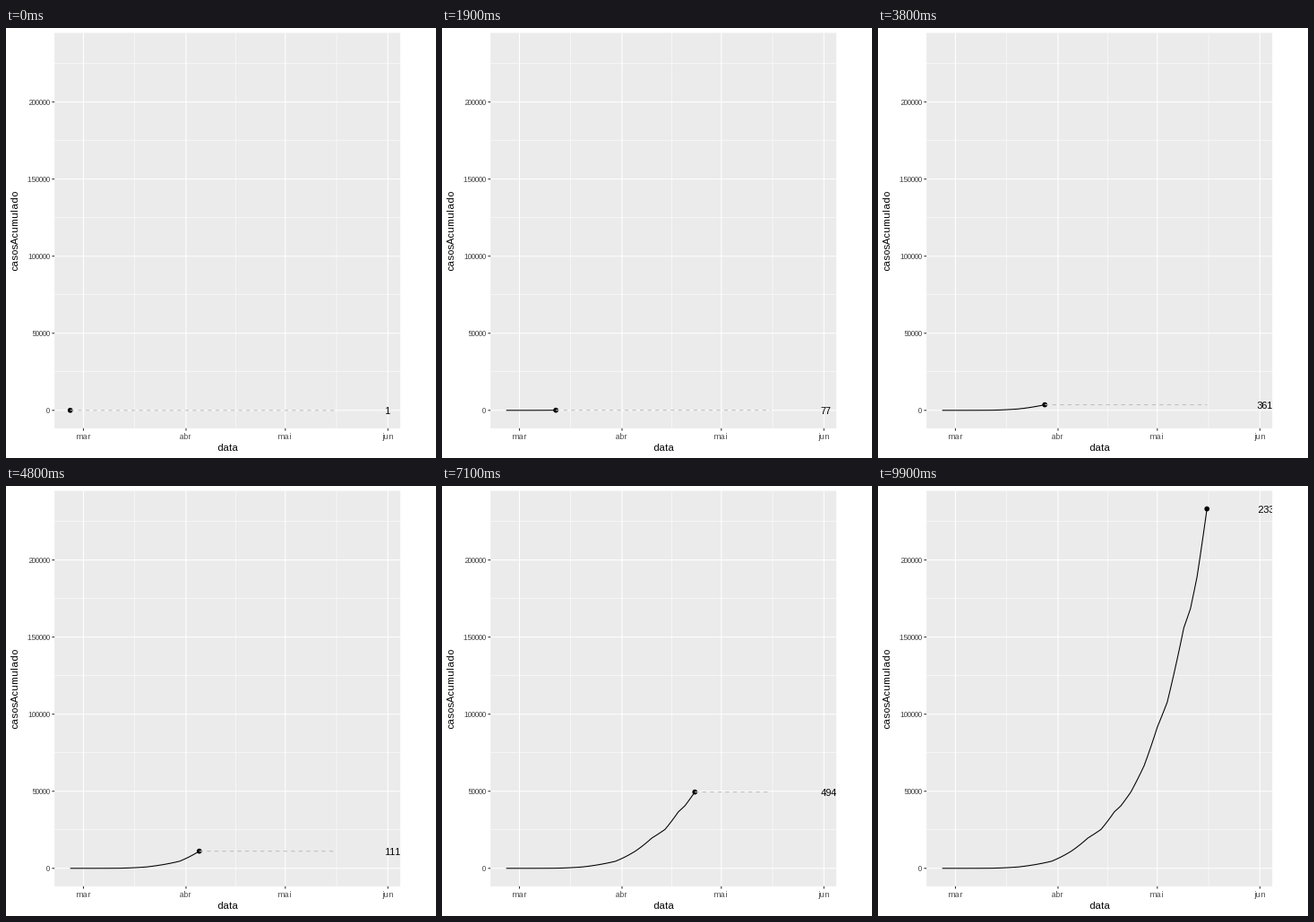
A matplotlib script for the animation above (10000 ms loop, 480 by 480 pixels).

```python
import matplotlib.pyplot as plt
import numpy as np
from matplotlib.animation import FuncAnimation
from matplotlib.patches import Circle, Rectangle
from matplotlib.transforms import Bbox

SIZE, FRAMES, INTERVAL = 480, 100, 100
LEFT, RIGHT, TOP, BOTTOM = 54.15, 440.15, 5.48, 446.85
LINE = 1.067
LAST_DAY, LABEL_DAY = 80, 95

# (day, cumulative cases); growth is close to quadratic between these points
KNOTS = [(0, 1), (7, 3), (9, 13), (15, 77), (23, 904), (33, 4579), (39, 11130),
         (44, 19638), (48, 25262), (52, 36599), (54, 40581), (57, 49492),
         (61, 66501), (65, 91589), (68, 107780), (73, 155939), (75, 168331),
         (77, 188974), (80, 233142)]
knot_days, knot_cases = np.transpose(KNOTS)
DAYS = np.arange(LAST_DAY + 1)
CASES = np.round(np.interp(DAYS, knot_days, np.sqrt(knot_cases)) ** 2)

# Each day lands on a whole frame; frames in between are interpolated
KEYS = np.round(DAYS * (FRAMES - 1) / LAST_DAY)


def px(day):
    step = (RIGHT - LEFT) / 1.1 / LABEL_DAY
    return LEFT + (0.05 * LABEL_DAY + day) * step


def py(cases):
    span = CASES[-1] - CASES[0]
    return BOTTOM - (0.05 * span + cases - CASES[0]) * (BOTTOM - TOP) / 1.1 / span


# Whole-pixel letter spacing without kerning
plt.rcParams.update({"font.family": "Liberation Sans",
                     "text.hinting_factor": 1, "text.kerning_factor": 6})
fig = plt.figure(figsize=(SIZE / 72, SIZE / 72), dpi=72, facecolor="white")
ax = fig.add_axes([0, 0, 1, 1])
ax.set(xlim=(0, SIZE), ylim=(SIZE, 0))
ax.axis("off")


def stroke(xs, ys, color, width=LINE, **kw):
    return ax.plot(xs, ys, color=color, lw=width, snap=False,
                   solid_capstyle="butt", solid_joinstyle="round",
                   dash_capstyle="butt", **kw)[0]


def vline(day, width):
    stroke([px(day)] * 2, [TOP, BOTTOM], "white", width)


def hline(cases, width):
    stroke([LEFT, RIGHT], [py(cases)] * 2, "white", width)


def label(x, y, text, size=11, color="black", ha="center", **kw):
    return ax.text(x, y, text, size=size, color=color, ha=ha, va="baseline", **kw)


ax.add_patch(Rectangle((LEFT, TOP), RIGHT - LEFT, BOTTOM - TOP,
                       fc="#ebebeb", lw=0, snap=False))

months = {"mar": 4, "abr": 35, "mai": 65, "jun": 96}
starts = list(months.values())
levels = range(0, 200001, 50000)

for a, b in zip(starts, starts[1:]):
    vline((a + b) / 2, LINE / 2)
for level in levels:
    hline(level + 25000, LINE / 2)
for day in starts:
    vline(day, LINE)
for level in levels:
    hline(level, LINE)

for name, day in months.items():
    stroke([px(day)] * 2, [BOTTOM, BOTTOM + 2.74], "#333333")
    label(px(day), 459, name, 8.8, "#4d4d4d")
for level in levels:
    stroke([LEFT - 2.74, LEFT], [py(level)] * 2, "#333333")
    label(LEFT - 4.93, round(py(level) + 3.5), str(level), 8.8, "#4d4d4d", "right")

label((LEFT + RIGHT) / 2, 472, "data")
label(13, (TOP + BOTTOM) / 2, "casosAcumulado", rotation=90, rotation_mode="anchor")

curve = stroke([], [], "black", zorder=3)
dot = ax.add_patch(Circle((0, 0), 2.84, fc="black", lw=0, zorder=4))
guide = stroke([], [], "#bebebe", linestyle=(0, (4, 4)), zorder=5)
count = label(px(LABEL_DAY), 0, "", 11.04, ha="left", clip_on=True, zorder=6)
count.set_clip_box(Bbox([[LEFT, SIZE - BOTTOM], [RIGHT, SIZE - TOP]]))


def update(i):
    day = np.interp(i, KEYS, DAYS)
    cases = np.interp(i, KEYS, CASES)
    x, y = px(day), py(cases)
    past = DAYS < day
    curve.set_data(np.append(px(DAYS[past]), x), np.append(py(CASES[past]), y))
    dot.center = x, y
    guide.set_data([x, px(LAST_DAY)], [y, y])
    guide.set_visible(day < LAST_DAY)
    count.set_y(round(y + 4))
    count.set_text(f"{cases:.10g}")
    return curve, dot, guide, count


anim = FuncAnimation(fig, update, frames=FRAMES, interval=INTERVAL,
                     init_func=lambda: update(0), repeat=True, repeat_delay=0)
plt.show()
```
